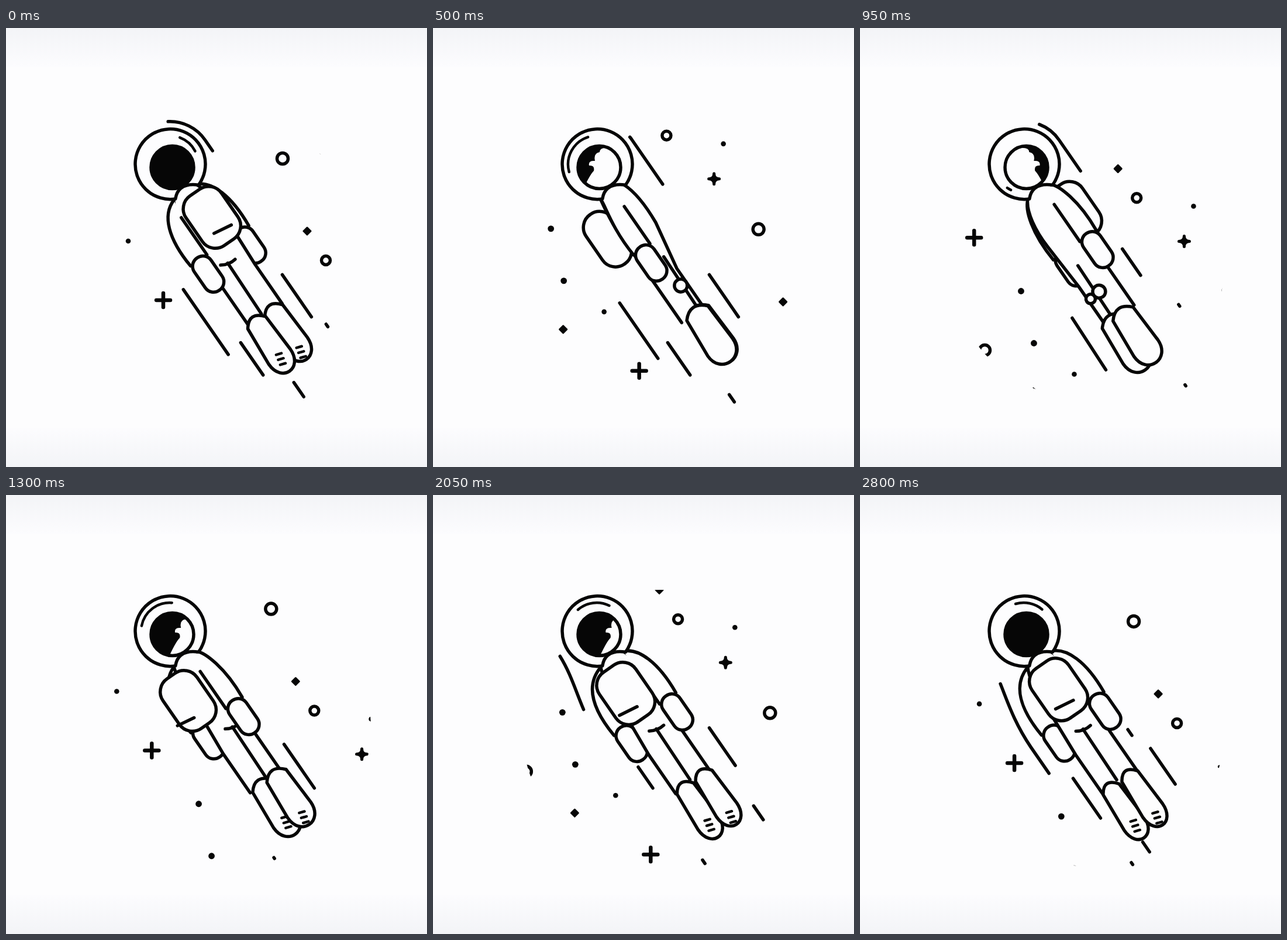
Animation, 720 px wide and 750 px high, one loop 2.85 s. Source, as an HTML page:

```html
<!DOCTYPE html>
<html lang="en">
<head>
<meta charset="utf-8">
<title>Drifting astronaut</title>
<style>
html, body { margin: 0; width: 100%; height: 100%; overflow: hidden; background: #fdfdfe; }
svg { display: block; width: 100vw; height: 100vh; }
</style>
</head>
<body>
<svg viewBox="0 0 720 750" fill="none" stroke="#060606" stroke-width="5.5" stroke-linecap="round" stroke-linejoin="round">
  <defs>
    <linearGradient id="shade" x1="0" y1="0" x2="0" y2="1">
      <stop offset="0" stop-color="#f3f4f7"/><stop offset="1" stop-color="#fcfcfe"/>
    </linearGradient>
    <clipPath id="sky"><circle cx="388" cy="398" r="236"/></clipPath>
    <clipPath id="face"><circle cx="284.5" cy="238" r="37"/></clipPath>
  </defs>
  <g stroke="none">
    <rect width="720" height="750" fill="#fdfdfe"/>
    <rect width="720" height="66" fill="url(#shade)"/>
    <rect width="720" height="66" fill="url(#shade)" transform="matrix(1 0 0 -1 0 750)"/>
  </g>
  <g id="stars" clip-path="url(#sky)"></g>
  <g id="body" transform="rotate(-34.7)"></g>
  <g id="head"></g>
</svg>
<script>
const LOOP = 2850, FRAME = 50, DRIFT = 47, TURN = DRIFT / 2;
const WHITE = '#fdfdfe', INK = '#060606', MID = 86;
const el = id => document.getElementById(id);
const mix = (a, b, k) => a + (b - a) * k;
const rad = deg => deg * Math.PI / 180;

// Linear interpolation through [input, output] points.
function curve(points, t) {
  let i = 0;
  while (i < points.length - 2 && t >= points[i + 1][0]) i++;
  const [a, b] = [points[i], points[i + 1]];
  return mix(a[1], b[1], (t - a[0]) / (b[0] - a[0]));
}

// Time to drift step, and drift step to turning angle.
const PACE = [[0, 0], [500, 17], [950, 32], [1650, 54], [2050, 68], [2400, 79], [2800, 93], [2850, 94]];
const SPIN = [[0, 25], [7, 110], [8.5, 125], [17, 268], [21, 350], [22.5, 365], [TURN, 385]];

const path = (d, fill = 'none', more = '') => `<path d="${d}" fill="${fill}" ${more}/>`;
const circle = (x, y, r, fill = 'none', w = 5.5) =>
  `<circle cx="${x}" cy="${y}" r="${r}" fill="${fill}" stroke-width="${w}"/>`;
const box = (x, y, w, h, r) =>
  `<rect x="${x}" y="${y}" width="${w}" height="${h}" rx="${r}" fill="${WHITE}"/>`;

const SHAPES = {
  ring: (x, y, r) => circle(x, y, r),
  dot: (x, y, r) => circle(x, y, r, INK, 0),
  gem: (x, y, r) => path(`M${x},${y - r}l${r},${r}l${-r},${r}l${-r},${-r}z`, INK, 'stroke-width="3"'),
  plus: (x, y, r) => path(`M${x - r},${y}h${2 * r}M${x},${y - r}v${2 * r}`, 'none', 'stroke-width="6.5"'),
  spark: (x, y, r) => path(`M${x},${y - r}Q${x},${y} ${x + r},${y}Q${x},${y} ${x},${y + r}` +
    `Q${x},${y} ${x - r},${y}Q${x},${y} ${x},${y - r}`, INK, 'stroke-width="5"')
};

const STARS = [
  ['ring', 473, 223, 9.5], ['ring', 547, 397, 7.5], ['ring', 56, 323, 9],
  ['gem', 515, 347, 6], ['gem', 139, 394, 6], ['plus', 269, 465, 12], ['spark', 397, 137, 9],
  ['dot', 118, 222, 5.4], ['dot', 140, 311, 5.4], ['dot', 209, 364, 4.3], ['dot', 413, 77, 4.3], ['dot', 540, 212, 4]
];

function drawStars(step) {
  let out = '';
  for (const [kind, x, y, r] of STARS)
    for (const s of [step, step - DRIFT])
      out += SHAPES[kind](x + s * 4.92, y + s * 7.11, r);
  return out;
}

// Speed lines: path, range along it, and the angles at which a dash sets off.
const down = x => `M${x},0V900`;
const TRACKS = [
  ['M98,278A73,73 0 0 1 171,351V480', 17, 233, [5, 95, 160, 229]],
  ['M22,340C22,400 -4,440 -5,520V720', 0, 360, [150, 220, 340]],
  ['M34,0L8,900', 403, 733, [77]],
  [down(24), 578, 750, [224, 341]],
  [down(24), 770, 785, [315]],
  [down(148.5), 590, 779, [3, 170, 246, 295]],
  [down(162), 570, 733, [326]],
  [down(154), 540, 650, [96]],
  [down(179), 600, 702, [66]],
  [down(60), 760, 820, [217, 352]],
  [down(110), 805, 820, [70]]
];
const SWEEP = 60;

function drawLines(angle) {
  let out = '';
  for (const [d, top, end, starts] of TRACKS)
    for (const start of starts) {
      const k = (angle - start + 720) % 360 / SWEEP;
      if (k >= 1) continue;
      const tail = mix(top, end, k * k), head = mix(top, end, k * (2 - k));
      if (head - tail > 1.5)
        out += path(d, 'none', `stroke-dasharray="${head - tail} 2000" stroke-dashoffset="${-tail}"`);
    }
  return out;
}

function arm(x) {
  const side = x < MID ? -1 : 1, neck = side < 0 ? 69 : 116, inner = x - side * 17;
  const outer = `M${neck},405C${x + side * 8},415 ${x + side * 22},455 ${x + side * 17},514`;
  return path(`${outer}L${inner},514V436Z`, WHITE, 'stroke="none"') +
    path(`${outer}M${inner},437V514`) + box(x - 17.5, 509, 35, 67, 17);
}

function boot(x, half) {
  const a = x - half, b = x + half;
  return path(`M${a + 5},658Q${x},634 ${b - 3},658L${b},728C${b},768 ${a},768 ${a},728Z`, WHITE);
}

const treads = (x, y) => [0, 1, 2].map(i => `M${x - 3 - i * 2},${y + i * 9}l9,3`).join('');

function drawBody(angle) {
  const s = Math.sin(rad(angle)), c = Math.cos(rad(angle));
  const leftNear = s > 0.2, back = c > 0.25;
  const byDepth = (left, right) => leftNear ? [right, left] : [left, right];

  const packW = 54 + 22 * Math.abs(c), packX = MID + 46 * s - packW / 2;
  const slit = packX + packW * ((packX - 40) * 0.008 + 0.1);
  const pack = box(packX, 415, packW, 103, 27) + (back ? path(`M${slit},491l${packW * 0.44},5`) : '');

  const [farArm, nearArm] = byDepth(MID + 6 * s - 48 * c, MID + 6 * s + 48 * c).map(arm);
  const leg = 22.5 + 13 * Math.abs(c), split = MID - 16 * s * Math.abs(s);
  const feet = [-1, 1].map(side => MID + side * 19.5 * c - 8 * s);
  const waist = 56 - 6 * s;

  let out = drawLines(angle) + (back ? '' : pack) + farArm;
  out += path(`M${MID - leg},656V575L${waist},490C${waist - 2},455 ${waist + 4},420 69,404L98,360L116,406` +
    `C124,425 127,450 124,490L${MID + leg},575V656`, WHITE);
  out += path(`M${split},546L${split - 2},650`);
  if (back) {
    out += path(`M${split - 12},542Q${split},550 ${split + 14},548`);
  } else {
    const x = MID + 2 - 10 * s;
    if (s > 0) out += circle(x - 19, 605, 8, WHITE);
    out += circle(x, 603, 11, WHITE);
  }
  out += byDepth(...feet).map(x => boot(x, 20 + 6 * Math.abs(s))).join('');
  if (back) out += path(treads(feet[0], 722) + treads(feet[1], 732), 'none', 'stroke-width="4.5"');
  out += nearArm + (back ? pack : '');
  return out + path('M118,408A60,60 0 1 0 72,405Q92,384 118,408Z', WHITE);
}

const HAIR = 'M160,185H-26V205Q-8,203 -8,212Q3,214 0,227Q12,226 10,235Q0,234 2,244Q10,252 24,284H160Z';

function drawHead(angle) {
  const s = Math.sin(rad(angle)), c = Math.cos(rad(angle));
  const edge = s > 0 ? 283 - c * (c > 0 ? 75 : 25) : 278 + c * 28;
  const hair = path(HAIR, INK, `stroke="none" transform="translate(${edge} 0) scale(${s > 0 ? 1 : -1} 1)"`);

  // The glint slides round the rim and shrinks on the far side.
  const mid = angle - 85 + 42 * (1 - c) + 18 * s, half = 24 - 20 * s + 6 * c;
  const at = deg => `${280 + 49 * Math.cos(rad(deg))},${233 + 49 * Math.sin(rad(deg))}`;
  return circle(284.5, 238, 36.5, WHITE) + `<g clip-path="url(#face)">${hair}</g>` +
    (half > 1 ? path(`M${at(mid - half)}A49,49 0 0 1 ${at(mid + half)}`, 'none', 'stroke-width="4.5"') : '');
}

let shown = -1;
function render(ms) {
  const t = Math.floor(ms % LOOP / FRAME) * FRAME;
  const step = Math.round(curve(PACE, t));
  if (step === shown) return;
  shown = step;
  const angle = curve(SPIN, step % TURN);
  el('stars').innerHTML = drawStars(step % DRIFT);
  el('body').innerHTML = drawBody(angle);
  el('head').innerHTML = drawHead(angle);
}

const start = performance.now();
function tick() {
  render(performance.now() - start);
  requestAnimationFrame(tick);
}
tick();
</script>
</body>
</html>
```
